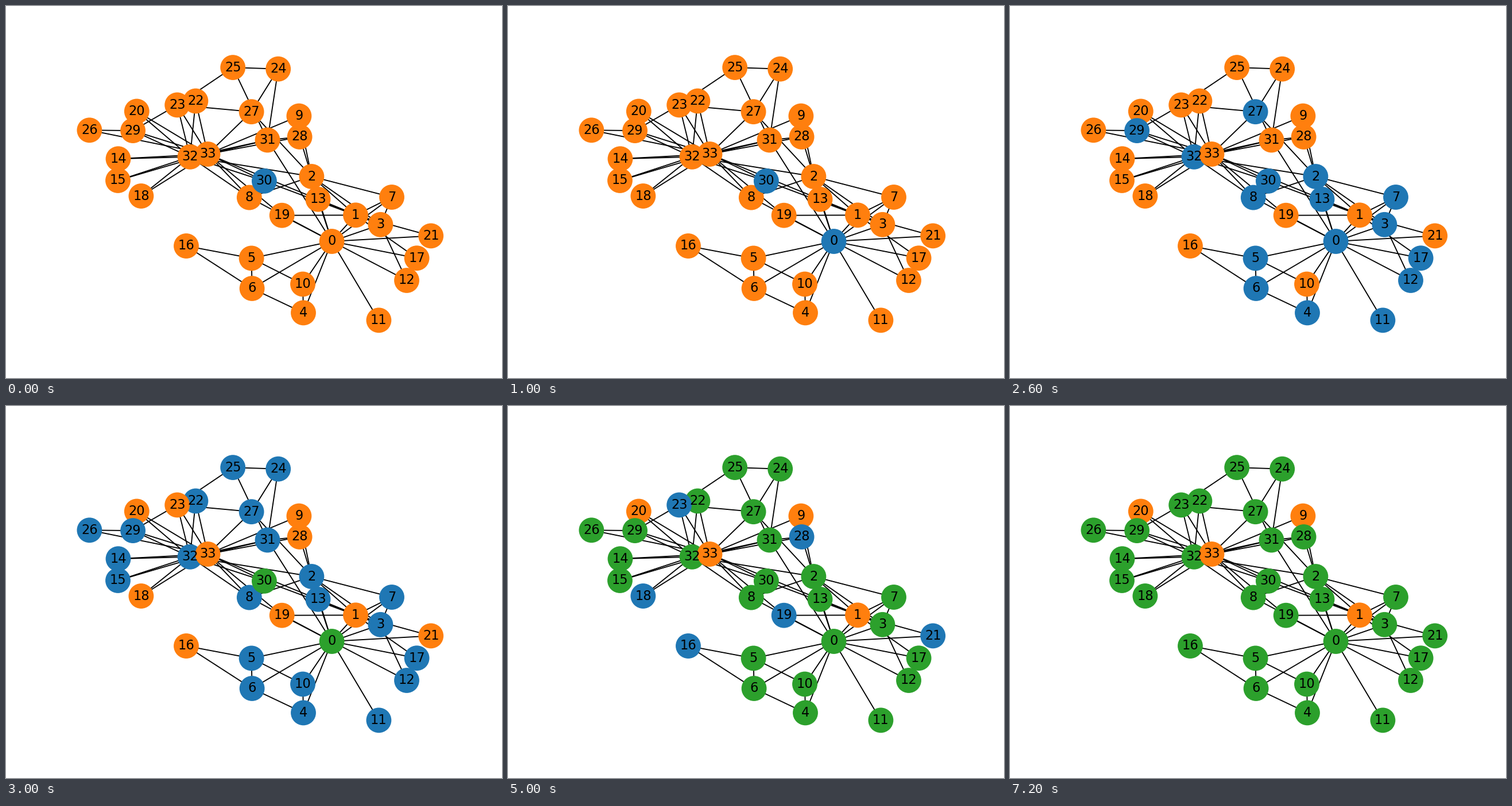
A matplotlib script for the animation above (8 s loop, 864x648 px).

```python
from itertools import combinations, product

import matplotlib.pyplot as plt
from matplotlib.animation import FuncAnimation
from matplotlib.collections import LineCollection

W, H, DPI = 864, 648, 135
STEPS, STEP_MS = 8, 1000

SUSCEPTIBLE, INFECTED, REMOVED = "tab:orange", "tab:blue", "tab:green"

# Node centres in pixels, y pointing down
POS = [
    (567.6, 410), (609, 364.3), (532.4, 297), (652.4, 380.8), (518, 534.4),
    (427.6, 439.4), (428.6, 492), (672, 333), (423.8, 333.6), (510.4, 191.6),
    (517, 484.5), (649.4, 547.4), (698, 478), (543.5, 336.7), (195.5, 266.2),
    (195, 304), (314, 418), (715.6, 439.2), (235.4, 331), (480.7, 364.7),
    (227.8, 183.5), (740.2, 400.4), (330.4, 165.5), (298.2, 172.4),
    (474.2, 109.7), (395.2, 107.1), (145.4, 216.3), (427.6, 184.2),
    (511.6, 228), (221.1, 217.1), (449.9, 304.9), (455.5, 233.5),
    (320.6, 262.8), (351.5, 258),
]
N = len(POS)

# Every node on the left is tied to every node on the right
JOINS = [
    (range(4), [7, 13]),
    ([0, 1], [17, 19, 21]),
    ([0], [4, 5, 6, 8, 10, 11, 12, 31]),
    ([2], [8, 9, 27, 28, 32]),
    ([3], [12]),
    ([4, 5], [6, 10]),
    ([16], [5, 6]),
    ([23, 24], [25, 27]),
    ([29], [23, 26]),
    ([30], [1, 8]),
    ([31], [24, 25, 28]),
    ([32, 33], [8, 14, 15, 18, 20, 22, 23, 29, 30, 31]),
    ([33], [9, 13, 19, 26, 27, 28, 32]),
]

# The outbreak reaches most nodes at step 2; these are the others
IMMUNE = {1, 9, 20, 33}
CAUGHT = {node: 2 for node in range(N) if node not in IMMUNE}
CAUGHT.update({30: 0, 0: 1})
CAUGHT.update(dict.fromkeys([10, 14, 15, 22, *range(24, 27), 31], 3))
CAUGHT.update(dict.fromkeys([16, 18, 19, 21, 23, 28], 4))


def state_color(node, step):
    start = CAUGHT.get(node, STEPS)
    if step < start:
        return SUSCEPTIBLE
    # The first carrier recovers together with the second
    return INFECTED if step < max(start, 1) + 2 else REMOVED


def colors_at(step):
    return [state_color(node, step) for node in range(N)]


def all_links():
    yield from combinations(range(4), 2)
    for left, right in JOINS:
        yield from product(left, right)


fig = plt.figure(figsize=(W / DPI, H / DPI), dpi=DPI, facecolor="white")
ax = fig.add_axes([0, 0, 1, 1])
ax.set_axis_off()

segments = [(POS[a], POS[b]) for a, b in all_links()]
ax.add_collection(LineCollection(segments, colors="black", linewidths=1, zorder=1))

nodes = ax.scatter(*zip(*POS), s=500, c=colors_at(0), linewidths=1, zorder=2)
for i, (x, y) in enumerate(POS):
    ax.text(x, y, str(i), size=12, family="DejaVu Sans", color="black",
            ha="center", va="center", zorder=3)

ax.set_xlim(0, W)
ax.set_ylim(H, 0)


def update(step):
    nodes.set_color(colors_at(step))
    return [nodes]


anim = FuncAnimation(fig, update, frames=STEPS, interval=STEP_MS,
                     repeat=True, repeat_delay=0, blit=False)
plt.show()
```
